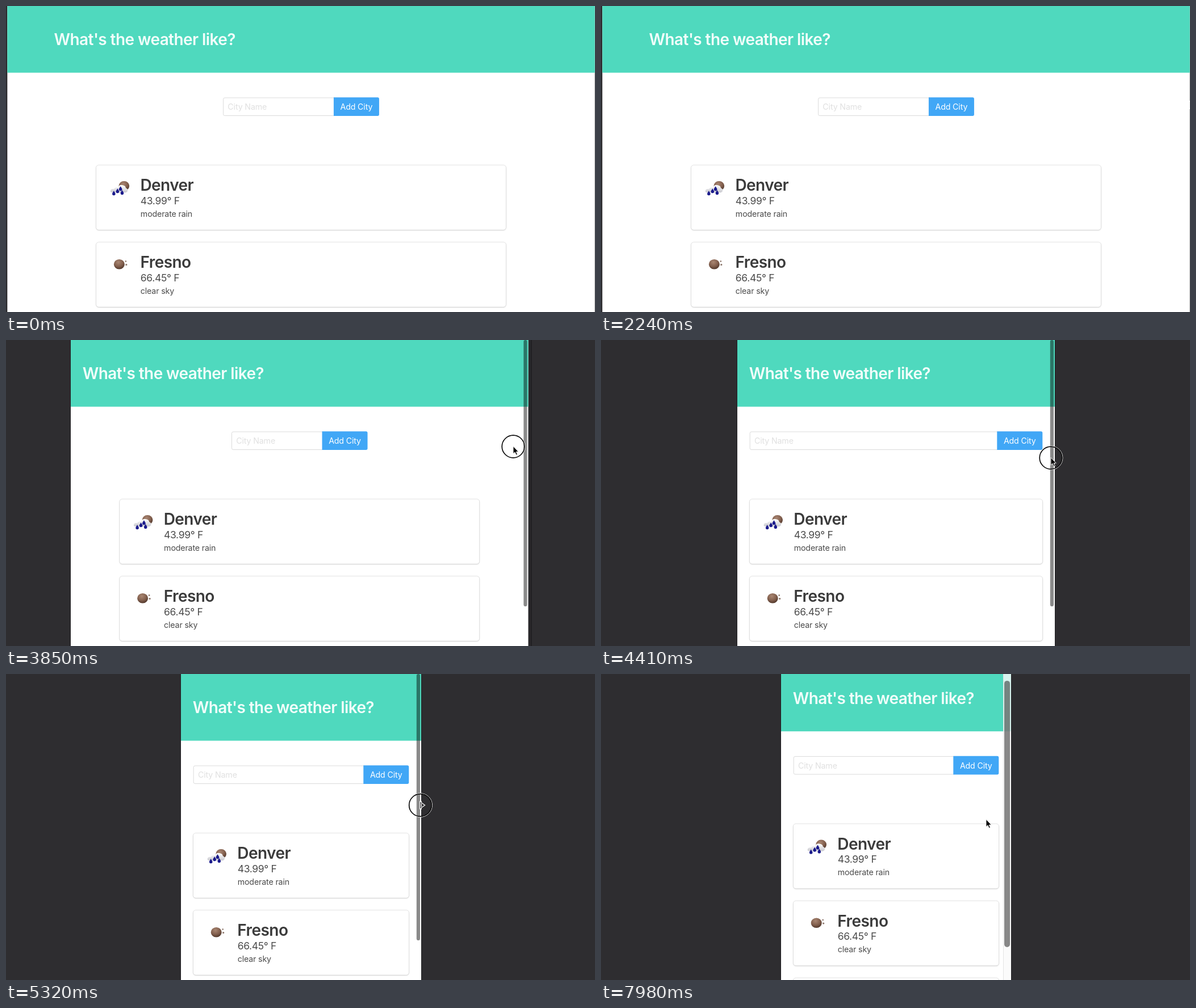
Animation, 1037 px wide and 540 px high, one loop 8000 ms. Source, as an HTML page:

```html
<!DOCTYPE html>
<html lang="en">
<head>
<meta charset="utf-8">
<title>Weather page resize</title>
<style>
  html, body { margin: 0; width: 100%; height: 100%; overflow: hidden; background: #2e2d30; }
  svg { display: block; width: 100vw; height: 100vh; }
  text { font: 400 14.2px Inter, "Open Sans", sans-serif; letter-spacing: -.01em; fill: #4a4a4a; }
  .title { font-size: 28px; font-weight: 600; letter-spacing: -.02em; fill: #3b3b3b; }
  .hero { letter-spacing: -.021em; fill: #f1fdfa; }
  .temp { font-size: 17.5px; letter-spacing: -.02em; }
  .hint { fill: #e0e0e0; }
  .label { fill: #fff; }
  .box { fill: #fff; filter: drop-shadow(0 1.6px 1.2px rgba(10, 10, 10, .13)); }
  .edge { fill: none; stroke: #0a0a0a; stroke-opacity: .1; }
</style>
</head>
<body>
<svg viewBox="0 0 1037 540" preserveAspectRatio="none">
  <defs>
    <radialGradient id="brown" cx=".42" cy=".3" r=".75">
      <stop offset="0" stop-color="#a98672"/>
      <stop offset=".55" stop-color="#83604e"/>
      <stop offset="1" stop-color="#4b3226"/>
    </radialGradient>
    <linearGradient id="cloud" x2="0" y2="1">
      <stop offset="0" stop-color="#fff"/>
      <stop offset="1" stop-color="#c9c9cf"/>
    </linearGradient>
    <path id="drop" d="M0-4.6C1.2-2 2.8-.8 2.8 1A2.8 2.8 0 0 1-2.8 1C-2.8-.8-1.2-2 0-4.6Z" fill="#1b1b8c"/>
    <g id="rain">
      <ellipse cx="49" cy="36.5" rx="9.3" ry="8.4" fill="url(#brown)"/>
      <path d="M25 45q1-4 6-3q2-4 7-2q2-6 8-5q6 1 6 5q5 2 3 6q-2 3-6 2H29q-5 0-4-3Z" fill="url(#cloud)"/>
      <use href="#drop" x="31" y="49.5"/>
      <use href="#drop" x="37.5" y="45.5"/>
      <use href="#drop" x="42.8" y="41.5"/>
      <use href="#drop" x="45.6" y="48.3"/>
    </g>
    <g id="clear">
      <ellipse cx="40.5" cy="38.7" rx="9.5" ry="8.8" fill="url(#brown)"/>
      <circle cx="52" cy="33.5" r="1.3" fill="#8a7469"/>
      <circle cx="53" cy="39.5" r="1.6" fill="#8a7469"/>
    </g>
    <clipPath id="view"><rect id="viewBox" height="540"/></clipPath>
  </defs>

  <rect width="1037" height="540" fill="#2e2d30"/>
  <rect id="frame" y="-2" height="544" fill="#28272a" stroke="#1f1e21" stroke-width="1.5"/>
  <g clip-path="url(#view)">
    <rect width="1037" height="540" fill="#fff"/>
    <g id="page">
      <rect y="-20" width="1037" height="137.7" fill="#4fd9be"/>
      <text id="heading" class="title hero" y="69">What's the weather like?</text>
      <g id="form">
        <rect id="input" x=".5" y="162" height="31.5" rx="2.7" fill="#fff" stroke="#dbdbdb"/>
        <text class="hint" x="8.3" y="183">City Name</text>
        <g id="button">
          <path d="M0 161.3H77.3a2.7 2.7 0 0 1 2.7 2.7V191.3a2.7 2.7 0 0 1-2.7 2.7H0Z" fill="#41a7f6"/>
          <text class="label" x="11.6" y="183">Add City</text>
        </g>
      </g>
      <g id="cards"></g>
    </g>
    <rect id="track" y="-2" width="16" height="544" fill="#fafafa" fill-opacity=".8" stroke="#e4e4e4"/>
    <rect id="thumb" height="470" fill="#000" fill-opacity=".46"/>
  </g>
  <g id="cursor">
    <g id="ring" fill="none">
      <circle r="20.9" stroke="#fff"/>
      <circle r="19.8" stroke="#0a0a0a" stroke-width="1.7"/>
    </g>
    <path id="arrow" d="M0-.5V12.6L3 9.9 5.3 15 7.4 14.1 5.3 9.2H9.3Z" stroke="#fff" stroke-width=".9"/>
    <path id="resize" d="M-.8-6.5H1.8V-4.5L8 0 1.8 4.5V6.5H-.8ZM1.8-3V3" fill="#2e2d30" stroke="#fff" stroke-width="1.3"/>
  </g>
</svg>
<script>
const LOOP = 8000, STEP = 70;
const PAD = 21.7, BUTTON = 80, CONTAINER = 868;
const TABLET_MIN = 695, DESKTOP_MIN = 926;
const SYMMETRY = 1039; // frame left + frame right
const PRESS = 2730, RELEASE = 7140;

// Poses of the drag; values between them follow a smooth monotone curve
const drag = [
  { t: 3080, left: 2.3, right: 1036.7, x: 1037, y: 174.5 },
  { t: 3850, left: 114, right: 919.5, x: 893, y: 188 },
  { t: 4410, left: 240, right: 799, x: 792, y: 208 },
  { t: 5320, left: 308, right: 731, x: 729.5, y: 231.5 },
  { t: 6720, left: 315, right: 727.5, x: 724, y: 231.5 },
  { t: RELEASE, left: 317, right: 722, x: 724, y: 231.5 }
];

const $ = id => document.getElementById(id);
const clamp = u => Math.min(1, Math.max(0, u));
const ramp = (t, from, to) => clamp((t - from) / (to - from));
const smooth = u => u * u * (3 - 2 * u);
const mix = (a, b, u) => a + (b - a) * u;

function set(id, attrs) {
  for (const name in attrs) $(id).setAttribute(name, attrs[name]);
}
const move = (id, x, y = 0) => set(id, { transform: `translate(${x} ${y})` });
const show = (id, on) => set(id, { visibility: on ? 'visible' : 'hidden' });

const rate = (key, i) => (drag[i + 1][key] - drag[i][key]) / (drag[i + 1].t - drag[i].t);

function slope(key, i) {
  if (i === 0 || i === drag.length - 1) return 0;
  const a = rate(key, i - 1), b = rate(key, i);
  return a * b > 0 ? 2 * a * b / (a + b) : 0;
}

function pose(key, t) {
  const next = drag.findIndex(p => p.t > t);
  if (next === 0) return drag[0][key];
  if (next < 0) return drag[drag.length - 1][key];
  const i = next - 1, span = drag[next].t - drag[i].t;
  const u = (t - drag[i].t) / span, v = 1 - u;
  return mix(drag[i][key], drag[next][key], smooth(u))
    + span * u * v * (v * slope(key, i) - u * slope(key, next));
}

const cities = [
  ['Denver', '43.99° F', 'moderate rain', 'rain'],
  ['Fresno', '66.45° F', 'clear sky', 'clear'],
  ['', '', '', '']
];
$('cards').innerHTML = cities.map(([city, temp, sky, icon], i) => `
  <g transform="translate(0 ${281 + i * 136})">
    <rect class="box" height="114" rx="4.5"/>
    <rect class="edge" x="-.3" y="-.3" height="114.6" rx="4.8"/>
    ${icon && `<use href="#${icon}"/>`}
    <text class="title" x="77.6" y="45">${city}</text>
    <text class="temp" x="78" y="68.6">${temp}</text>
    <text x="78" y="90.5">${sky}</text>
  </g>`).join('');
const boxes = document.querySelectorAll('.box');
const edges = document.querySelectorAll('.edge');

function layout(left, right) {
  const width = right - left;
  const inner = width >= DESKTOP_MIN ? CONTAINER : width - 2 * PAD;
  const start = (left + right - inner) / 2;
  const mobile = width < TABLET_MIN;
  const field = mobile ? inner : (inner + PAD) / 3 - PAD;
  const inset = mobile ? 0 : inner * .0845;
  const card = inner - 2 * inset;

  set('heading', { x: start - .9 });
  move('form', start + (inner - field) / 2);
  set('input', { width: field - BUTTON + 3 });
  move('button', field - BUTTON);
  move('cards', start + inset);
  boxes.forEach(b => b.setAttribute('width', card));
  edges.forEach(e => e.setAttribute('width', card + .6));
}

function drawScrollbar(t, right, scroll) {
  const wide = t > RELEASE + STEP;
  const width = wide ? 10 : 6.2;
  show('track', wide);
  show('thumb', t > PRESS);
  set('track', { x: right - 13.5 });
  set('thumb', { x: right - 2 - width, y: scroll * .72, width, rx: width / 2 });
}

function drawCursor(t) {
  const leave = smooth(ramp(t, RELEASE + STEP, 7700));
  const arrow = (t > 3450 && t < 4900) || leave > 0;
  const visible = t >= 2030;
  move('cursor', mix(pose('x', t), 678, leave), mix(pose('y', t), 257, leave));
  show('ring', t >= PRESS && t < RELEASE);
  show('arrow', visible && arrow);
  show('resize', visible && !arrow);
}

function draw(t) {
  const left = pose('left', t), right = SYMMETRY - left;
  const pageRight = pose('right', t);
  const scroll = 16.5 * ramp(t, 7770, 7980) ** 1.5;
  set('frame', { x: left, width: right - left });
  set('viewBox', { x: left, width: Math.min(right, pageRight) - left });
  move('page', 0, -scroll);
  layout(left, pageRight);
  drawScrollbar(t, pageRight, scroll);
  drawCursor(t);
}

let origin;
function tick(now) {
  origin ??= now;
  const t = (now - origin) % LOOP;
  draw(Math.floor(t / STEP + 1e-6) * STEP);
  requestAnimationFrame(tick);
}
draw(0);
requestAnimationFrame(tick);
</script>
</body>
</html>
```
